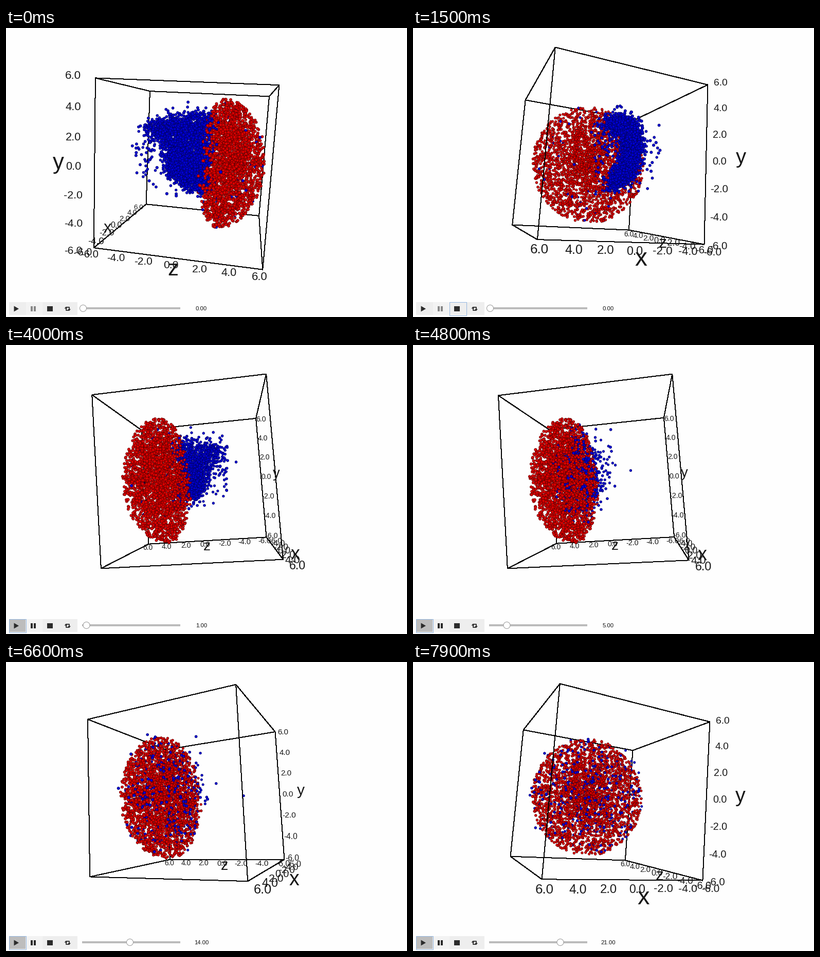
Animation of 780x563 px, one loop 8 s. Source, as a matplotlib script:

```python
import itertools
import numpy as np
import matplotlib.pyplot as plt
from matplotlib.animation import FuncAnimation
from matplotlib.collections import LineCollection
from matplotlib.patches import Circle, Polygon, Rectangle

W, H, DPI = 780, 563, 100
PT = 72 / DPI                       # points per pixel
STEP, FRAMES = 100, 80
CX, CY, SCALE, DIST = 366, 259.5, 276.2, 2.31
PLAY_AT = 3800
FONT = "Liberation Sans"

rng = np.random.default_rng(7)


# camera
def turn(yaw, pitch, roll):
    c, s = np.cos(np.radians(yaw)), np.sin(np.radians(yaw))
    ry = np.array([(c, 0, s), (0, 1, 0), (-s, 0, c)])
    c, s = np.cos(np.radians(pitch)), np.sin(np.radians(pitch))
    rx = np.array([(1, 0, 0), (0, c, -s), (0, s, c)])
    c, s = np.cos(np.radians(roll)), np.sin(np.radians(roll))
    rz = np.array([(c, -s, 0), (s, c, 0), (0, 0, 1)])
    return rz @ rx @ ry


def slerp(a, b, u):
    """Part of the single-axis turn that leads from a to b."""
    rel = b @ a.T
    angle = np.arccos(np.clip((np.trace(rel) - 1) / 2, -1, 1))
    skew = (rel - rel.T) / (2 * np.sin(angle))
    part = u * angle
    return (np.eye(3) + np.sin(part) * skew
            + (1 - np.cos(part)) * skew @ skew) @ a


def smooth(u):
    return u * u * (3 - 2 * u)


def steady(u):
    return u


def speed_up(u):
    return u ** 2.5


START = turn(80.5, 8.4, -3.1)
# mouse drags: begin, end, pose reached, easing
DRAGS = [(300, 1500, turn(201.3, -8.2, -3.9), smooth),
         (1800, 2500, turn(262.8, -4.1, 4.2), smooth),
         (4600, 5600, turn(258.9, -2.6, 4.1), steady),
         (5600, 6600, turn(245, -5.7, 2.6), speed_up),
         (6600, 7200, turn(227, -11.3, 0), steady),
         (7200, 7900, turn(203.6, -5.6, -4.4), steady)]


def camera(t):
    pose = START
    for begin, end, goal, ease in DRAGS:
        if t < end:
            u = max(0, (t - begin) / (end - begin))
            return slerp(pose, goal, ease(u))
        pose = goal
    return pose


def project(pts, cam):
    """Pixel positions, depth towards the viewer and magnification."""
    v = np.asarray(pts) @ cam.T
    k = 1 / (1 - v[:, 2] / DIST)
    xy = np.c_[CX + SCALE * v[:, 0] * k, CY - SCALE * v[:, 1] * k]
    return xy, v[:, 2], k


# point clouds
def lens(n):
    """Points in the egg-shaped cloud, denser along its axis."""
    u = rng.random(n) ** 0.7
    phi = rng.uniform(0, 2 * np.pi, n)
    z = 2.4 + np.sqrt(1 - u ** 2) * rng.uniform(-2.0, 3.45, n)
    return np.c_[5.3 * u * np.cos(phi), 5.3 * u * np.sin(phi), z]


def arch(n):
    """Points on the curved band with a long upper arm."""
    a = np.radians(rng.uniform(-75, 92, n))
    w = rng.random(n)
    low = -1.6 - 2.7 * np.clip(np.sin(a), 0, 1) ** 2
    r = 3.3 * (1 - 0.42 * w ** 2) * rng.uniform(0.68, 1, n)
    pts = np.c_[-0.4 - r * np.cos(a), 0.8 + r * np.sin(a),
                1.4 + w * (low - 1.4)]
    return pts + rng.normal(0, 0.35, (n, 3))


def stray(n):
    pts = rng.normal((-1.2, 0.6, 0), (1.3, 1.4, 0), (n, 3))
    pts[:, 2] = rng.uniform(-4.6, 0.5, n)
    return pts


N_RED, N_BLUE, N_STRAY, N_INNER = 2900, 2800, 150, 60
red = lens(N_RED)
blue_from = rng.permutation(np.r_[
    arch(N_BLUE - N_STRAY - N_INNER), stray(N_STRAY), lens(N_INNER)])
blue_to = lens(N_BLUE)
loose = rng.random(N_BLUE) < 0.11
blue_to[loose] = rng.normal((0, 0.8, 0.5), (1.8, 1.9, 1.4), (loose.sum(), 3))
phase = rng.uniform(0, 2 * np.pi, (N_BLUE, 3))
speed = rng.uniform(0.6, 1.6, (N_BLUE, 3))

FILL = np.array([(0.86, 0, 0, 1), (0, 0, 0.82, 1)])
RIM = np.array([(0.36, 0, 0, 1), (0, 0, 0.38, 1)])


def cloud(t):
    age = max(0, t - PLAY_AT)
    n = int(450 + (N_BLUE - 450) * np.exp(-age / 300))
    w = 1 - np.exp(-age / 800)
    wander = 0.5 * w * np.sin(speed * age / 260 + phase)
    blue = blue_from + w * (blue_to - blue_from) + wander
    kind = np.r_[np.zeros(N_RED, int), np.ones(n, int)]
    return np.r_[red, blue[:n]] / 12, kind


# stage
fig = plt.figure(figsize=(W / DPI, H / DPI), dpi=DPI, facecolor="#fefefe")
ax = fig.add_axes([0, 0, 1, 1])
ax.set_xlim(0, W)
ax.set_ylim(H, 0)
ax.axis("off")

corners = np.array(list(itertools.product((-0.5, 0.5), repeat=3)))
edges = [(i, j) for i, j in itertools.combinations(range(8), 2)
         if np.sum(corners[i] != corners[j]) == 1]
back, front = (ax.add_collection(LineCollection(
    [], colors="black", linewidths=PT, antialiaseds=False, zorder=z))
    for z in (1, 3))
dots = ax.scatter([], [], linewidths=0.5, zorder=2)

# axis texts: artist, anchor in the cube, font size, shift in pixels
labels = []


def add_label(text, pos, size, shift):
    art = ax.text(0, 0, text, family=FONT, color="#181818", ha="center",
                  va="center", zorder=5)
    labels.append((art, pos, size, np.array(shift)))


def on_axis(axis, value, offset):
    pos = np.full(3, -0.5)
    pos[axis] = value / 12
    return pos + offset


# per axis: offset of ticks, of the name, and their shifts
AXES = {"x": ((0, -0.038, -0.07), (0, -0.068, -0.14), (0, 0), (0, 0)),
        "y": ((-0.07, 0, -0.07), (-0.14, 0, -0.14), (-6, 0), (0, -7)),
        "z": ((-0.02, -0.035, 0), (-0.03, -0.055, 0), (-4, 0), (0, 0))}
for axis, (name, (tick_off, name_off, tick_shift, name_shift)) in enumerate(
        AXES.items()):
    for value in range(-6, 7, 2):
        add_label(f"{value:.1f}", on_axis(axis, value, tick_off), 17.2,
                  tick_shift)
    add_label(name, on_axis(axis, 0, name_off), 34, name_shift)


# control bar
def box(x, y, w, h, color, **kw):
    return ax.add_patch(Rectangle((x, y), w, h, fc=color,
                                  **{"ec": "none", "lw": 0, "zorder": 6, **kw}))


def ring(x):
    return box(x, 533.5, 33, 26, "none", ec="#93b5df", lw=PT, zorder=8)


def shape(pts, color="#2b2b2b"):
    ax.add_patch(Polygon(pts, fc=color, ec="none", zorder=9))


box(6, 534, 133, 25, "#eeeeee")
box(39, 534, 32, 25, "#f3f3f3")
pressed = box(6, 534, 32, 25, "#bdbdbd", zorder=7)
play_ring, stop_ring = ring(5.5), ring(70.5)
shape([(15.5, 541.5), (25, 547), (15.5, 552.5)])
bars = [box(x, 542, 4, 10, "#888888", zorder=9) for x in (48, 53.5)]
box(80, 542, 10.5, 10, "#2b2b2b", zorder=9)
for px, py in (((121.5, 116.5, 116.5), (550.3, 550.3, 546)),
               ((118, 123, 123), (543.7, 543.7, 548))):
    ax.plot(px, py, color="#2b2b2b", lw=1.3, zorder=9)
shape([(113.6, 546.5), (119.4, 546.5), (116.5, 542.8)])
shape([(120.1, 547.5), (125.9, 547.5), (123, 551.2)])

box(148, 544, 191, 4, "#bbbbbb")
knob = ax.add_patch(Circle((150, 546), 6.5, fc="white", ec="#9a9a9a",
                           lw=PT, zorder=8))
readout = ax.text(380, 547, "", family=FONT, size=11.3 * PT, color="#111111",
                  ha="center", va="center", zorder=8)


def draw_cube(cam):
    xy, depth, _ = project(corners, cam)
    groups = ([], [])
    for i, j in edges:
        groups[int(depth[i] + depth[j] > 0)].append((xy[i], xy[j]))
    back.set_segments(groups[0])
    front.set_segments(groups[1])
    xy, _, k = project([item[1] for item in labels], cam)
    for (art, _, size, shift), p, m in zip(labels, xy, k):
        art.set_position(p + shift * m)
        art.set_fontsize(size * m * PT)


def draw_cloud(t, cam):
    pts, kind = cloud(t)
    xy, depth, k = project(pts, cam)
    order = np.argsort(depth)
    kind = kind[order]
    dots.set_offsets(xy[order])
    dots.set_sizes((4.8 * PT * k[order]) ** 2)
    dots.set_facecolors(FILL[kind])
    dots.set_edgecolors(RIM[kind])


def draw_bar(t):
    playing = t >= 3400
    pressed.set_visible(playing)
    play_ring.set_visible(playing)
    stop_ring.set_visible(400 <= t < 3400)
    for bar in bars:
        bar.set_facecolor("#2b2b2b" if playing else "#888888")
    value = max(0, (t - 3700) // 200)
    knob.center = (150 + 6.5 * value, 546)
    readout.set_text(f"{value:.2f}")


def draw(frame):
    t = frame * STEP
    cam = camera(t)
    draw_cube(cam)
    draw_cloud(t, cam)
    draw_bar(t)
    return []


anim = FuncAnimation(fig, draw, frames=FRAMES, interval=STEP, repeat=True)
plt.show()
```
